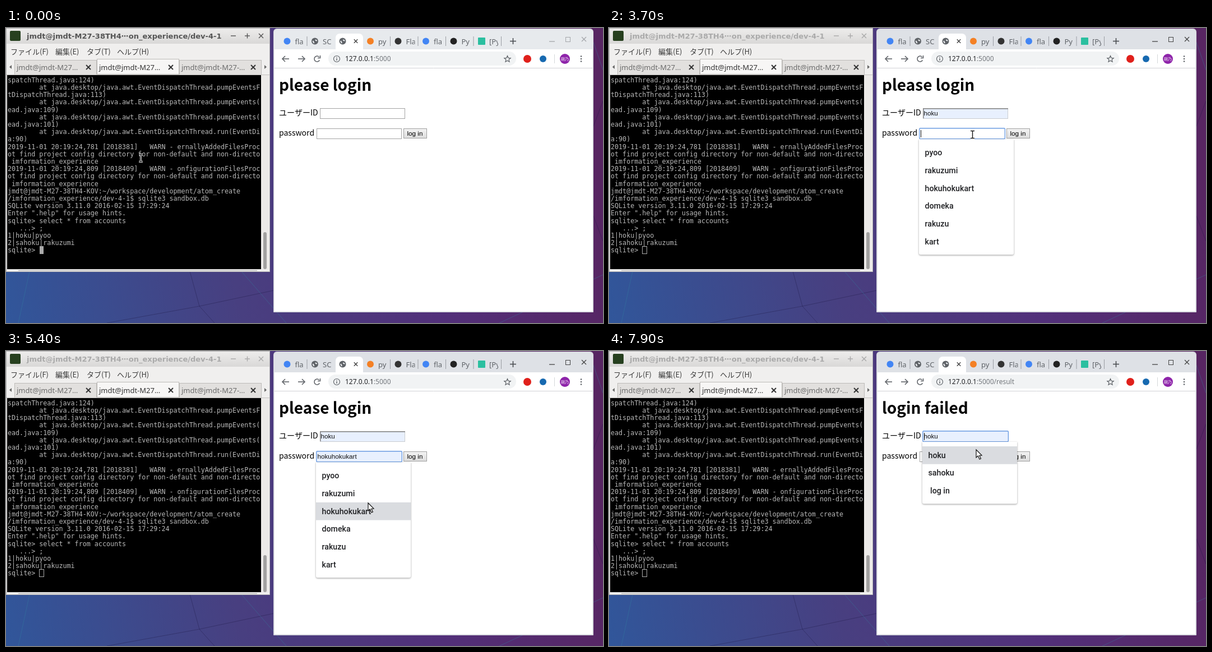
An HTML page with a canvas for the animation above (8 s loop, 1065 by 526 pixels).

```html
<!DOCTYPE html>
<html lang="ja">
<head>
<meta charset="utf-8">
<style>
html, body { margin: 0; width: 1065px; height: 526px; overflow: hidden; }
canvas { display: block; }
</style>
</head>
<body>
<canvas id="stage" width="1065" height="526"></canvas>
<script>
const ctx = document.getElementById('stage').getContext('2d');
const LOOP = 8000, STEP = 100;
const UI = '"Noto Sans", "Noto Sans CJK JP", sans-serif';
const CJK = '"Noto Sans CJK JP", "Noto Sans CJK", sans-serif';
const MONO = '"DejaVu Sans Mono", monospace';
const FORM = '"Liberation Sans", Arial, sans-serif';
const MENU = 'Roboto, sans-serif';

const USER = 'hoku', PASS = 'hokuhokukart', HOST = 'jmdt@jmdt-M27';
const PASSWORDS = ['pyoo', 'rakuzumi', PASS, 'domeka', 'rakuzu', 'kart'];
const USERS = [USER, 'sahoku', ' log in'];
const PUMP = '        at java.desktop/java.awt.EventDispatchThread.';
const CONFIG = ['ot find project config directory for non-default and non-directo', ' imformation_experience'];
const LOG = [
  'spatchThread.java:124)', PUMP + 'pumpEventsF',
  'tDispatchThread.java:113)', PUMP + 'pumpEvents(',
  'ead.java:109)', PUMP + 'pumpEvents(',
  'ead.java:101)', PUMP + 'run(EventDi', 'a:90)',
  '2019-11-01 20:19:24,781 [2018381]   WARN - ernallyAddedFilesProc', ...CONFIG,
  '2019-11-01 20:19:24,809 [2018409]   WARN - onfigurationFilesProc', ...CONFIG,
  HOST + '-38TH4-KOV:~/workspace/development/atom_create',
  '/imformation_experience/dev-4-1$ sqlite3 sandbox.db',
  'SQLite version 3.11.0 2016-02-15 17:29:24',
  'Enter ".help" for usage hints.',
  'sqlite> select * from accounts', '   ...> ;',
  `1|${USER}|pyoo`, '2|sahoku|rakuzumi', 'sqlite> '
];

// Pointer path: time, x, y
const PATH = [
  [200, 240, 232], [500, 130, 330], [800, 60, 398], [1000, 22, 384], [1100, 24, 390],
  [1300, 60, 372], [1600, 300, 262], [1800, 520, 170], [2000, 686, 102],
  [2100, 697, 112], [2200, 672, 148], [2300, 658, 156], [2500, 658, 156],
  [2600, 655, 184], [3600, 655, 184], [3700, 648, 190], [4200, 648, 258],
  [4400, 648, 258], [4500, 646, 270], [4600, 646, 270.5], [5000, 646, 270.5],
  [5100, 646, 266], [5200, 646, 263], [5300, 646, 263], [5400, 646, 270.5],
  [6200, 646, 270.5], [6300, 714, 203], [6500, 722, 190], [6800, 724, 190],
  [7000, 712, 195], [7100, 692, 196], [7200, 672, 180], [7300, 672, 180],
  [7400, 663, 161], [7500, 663, 161], [7600, 660, 157], [7700, 660, 157],
  [7800, 657, 171], [7900, 655, 176]
];

function pointerAt(t) {
  let a = PATH[0];
  for (const b of PATH) {
    if (t < b[0]) {
      const k = Math.max(0, (t - a[0]) / (b[0] - a[0] || 1));
      return { x: a[1] + (b[1] - a[1]) * k, y: a[2] + (b[2] - a[2]) * k };
    }
    a = b;
  }
  return { x: a[1], y: a[2] };
}

function rect(x, y, w, h, color) { ctx.fillStyle = color; ctx.fillRect(x, y, w, h); }
function frame(x, y, w, h, color) {
  ctx.strokeStyle = color; ctx.lineWidth = 1;
  ctx.strokeRect(x + .5, y + .5, w - 1, h - 1);
}
function round(x, y, w, h, r, color) {
  ctx.fillStyle = color; ctx.beginPath(); ctx.roundRect(x, y, w, h, r); ctx.fill();
}
function disc(x, y, r, color) {
  ctx.fillStyle = color; ctx.beginPath(); ctx.arc(x, y, r, 0, 7); ctx.fill();
}
function line(color, width, ...p) {
  ctx.strokeStyle = color; ctx.lineWidth = width; ctx.beginPath();
  for (let i = 0; i < p.length; i += 2) ctx.lineTo(p[i], p[i + 1]);
  ctx.stroke();
}
function text(s, x, y, font, color) { ctx.font = font; ctx.fillStyle = color; ctx.fillText(s, x, y); }
function cross(x, y, r, color, w) {
  line(color, w, x - r, y - r, x + r, y + r);
  line(color, w, x - r, y + r, x + r, y - r);
}
function vertical(y0, y1, c0, c1) {
  const g = ctx.createLinearGradient(0, y0, 0, y1);
  g.addColorStop(0, c0); g.addColorStop(1, c1);
  return g;
}

function wallpaper() {
  const g = ctx.createLinearGradient(0, 500, 1065, 300);
  g.addColorStop(0, '#31569a'); g.addColorStop(.38, '#483f80');
  g.addColorStop(.7, '#52307a'); g.addColorStop(1, '#572562');
  rect(0, 0, 1065, 526, g);
  const teal = 'rgba(50,130,160,.4)', dark = 'rgba(30,25,70,.4)';
  line(teal, 1, 42, 434, 22, 526);
  line(dark, 1, 345, 496, 328, 434);
  line(dark, 1, 180, 526, 345, 496, 477, 468);
  line(dark, 1, 345, 496, 372, 526);
  line(teal, 1, 420, 434, 500, 526);
  line(teal, 1, 880, 526, 1065, 440);
  line(teal, 1, 1046, 20, 1065, 75);
  line(dark, 1, 1046, 180, 1065, 130);
  line(dark, 1, 1046, 330, 1065, 380);
}

function terminal(active) {
  rect(0, 0, 471, 435, '#f0efee');
  rect(0, 0, 471, 28, vertical(0, 28, '#eeedec', '#d9d8d7'));
  const ink = active ? '#555' : '#aaa';
  round(7, 5, 19, 18, 2, '#27401f');
  text(HOST + '-38TH4⋯on_experience/dev-4-1', 37, 19, 'bold 13px "DejaVu Sans", sans-serif', ink);
  line(ink, 1.4, 401, 14, 410, 14);
  line(ink, 1.4, 426, 14, 435, 14);
  line(ink, 1.4, 430.5, 9.5, 430.5, 18.5);
  cross(455, 14, 4, ink, 1.4);

  [['ファイル(F)', 8], ['編集(E)', 88], ['タブ(T)', 144], ['ヘルプ(H)', 198]]
    .forEach(([s, x]) => text(s, x, 47, '13px ' + CJK, '#3c3c3c'));

  for (let i = 0; i < 3; i++) {
    const x = 15 + i * 147, on = i === 1;
    rect(x, on ? 55 : 57, 146, on ? 29 : 26, on ? '#f7f6f5' : '#e2e0de');
    frame(x, on ? 55 : 57, 147, 28, '#bdbbb8');
    text(HOST + (i === 2 ? '-…' : '…'), x + 4, 75, '13px ' + UI, on ? '#333' : '#6b6b6b');
    cross(147 + i * 147, 70, 4, '#333', 2);
  }
  ctx.fillStyle = '#666';
  for (const [x, d] of [[8, -1], [463, 1]]) {
    ctx.beginPath(); ctx.moveTo(x - 2 * d, 66); ctx.lineTo(x + 2 * d, 69.5); ctx.lineTo(x - 2 * d, 73); ctx.fill();
  }
  line('#c4c2c0', 1, 0, 83.5, 470, 83.5);

  rect(2, 84, 453, 346, '#000');
  ctx.save();
  ctx.beginPath(); ctx.rect(2, 84, 453, 346); ctx.clip();
  LOG.forEach((s, i) => text(s, 3, 96.8 + i * 13.2, '11.7px ' + MONO, '#b8b8b8'));
  ctx.restore();
  if (active) rect(60, 389, 7, 14, '#aaa'); else frame(59, 389, 9, 14, '#aaa');

  rect(455, 84, 14, 346, '#eceae8');
  round(459, 364, 6, 66, 3, '#a2a1a0');
  line('#aaa', 1, 22, 432.5, 448, 432.5);
  frame(0, 0, 471, 435, '#b4b3b4');
}

function globe(x, y) {
  disc(x, y, 6, '#5f6368');
  ctx.fillStyle = '#eceef1';
  ctx.beginPath(); ctx.ellipse(x - 2.5, y + 1.5, 1.2, 2.6, -.5, 0, 7); ctx.fill();
  ctx.beginPath(); ctx.ellipse(x + 2.2, y - 1.5, 2, 1.2, .5, 0, 7); ctx.fill();
}

function browserChrome(active, url) {
  const strip = active ? '#dee1e6' : '#e7eaed', ink = '#5f6368';
  round(477, 1, 571, 506, [6, 6, 1, 1], '#d3d4da');
  round(478, 2, 569, 504, [5, 5, 0, 0], strip);
  round(588, 10, 49, 32, [7, 7, 0, 0], '#fff');
  rect(479, 38, 567, 467, '#fff');

  const tabs = [['fla', '#4285f4'], ['SC', 0], ['', 0], ['py', '#f48024'], ['Fla', '#333'],
    ['fla', '#4285f4'], ['Py', '#222'], ['[Py', '#2bbfa0']];
  tabs.forEach(([s, color], i) => {
    const x = 501.5 + i * 49.5;
    if (!color) globe(x, 23.5);
    else if (i === 7) round(x - 6, 17, 13, 13, 1, color);
    else disc(x, 23.5, 6, color);
    ctx.save();
    ctx.beginPath(); ctx.rect(x + 10, 10, 20, 28); ctx.clip();
    text(s, x + 14, 28.5, '13px ' + UI, ink);
    ctx.restore();
    if (i !== 1 && i !== 2) line('#9a9da3', 1, x + 35.5, 15, x + 35.5, 32);
  });
  cross(624, 23.5, 3.2, '#444', 1.4);
  line('#4a4d52', 1.6, 899, 23.5, 910, 23.5);
  line('#4a4d52', 1.6, 904.5, 18, 904.5, 29);
  const control = active ? '#444' : '#a5a7ab';
  line(control, 1.3, 969, 24, 979, 24);
  frame(998, 16, 9, 9, control);
  cross(1031, 20, 4, control, 1.3);

  for (const [x, d] of [[499, -1], [527, 1]]) {
    line(ink, 1.6, x - 6 * d, 55, x + 5 * d, 55);
    line(ink, 1.6, x + d, 50, x + 6 * d, 55, x + d, 60);
  }
  ctx.strokeStyle = ink; ctx.lineWidth = 1.6;
  ctx.beginPath(); ctx.arc(555, 55, 5, .5, 5.5); ctx.stroke();
  line(ink, 1.6, 560.5, 49, 560.5, 53.5, 556, 53.5);

  round(575, 42, 335, 25, 12.5, '#f1f3f4');
  ctx.strokeStyle = ink; ctx.lineWidth = 1.2;
  ctx.beginPath(); ctx.arc(590, 55, 5.5, 0, 7); ctx.stroke();
  rect(589.3, 54, 1.4, 4, ink);
  rect(589.3, 51.5, 1.4, 1.4, ink);
  text('127.0.0.1', 605, 59, '12px ' + UI, '#202124');
  const hostWidth = ctx.measureText('127.0.0.1').width;
  text(url, 605 + hostWidth, 59, '12px ' + UI, '#73777c');

  ctx.strokeStyle = ink; ctx.lineWidth = 1.2; ctx.beginPath();
  for (let i = 0; i < 10; i++) {
    const a = -Math.PI / 2 + i * Math.PI / 5, r = i % 2 ? 2.7 : 6;
    ctx.lineTo(894.5 + r * Math.cos(a), 55.5 + r * Math.sin(a));
  }
  ctx.closePath(); ctx.stroke();
  disc(930, 55, 7, '#e0201b');
  disc(958, 55, 6, '#1769b0');
  line('#d5d7da', 1, 978.5, 47, 978.5, 63);
  disc(997, 55, 9, '#8e24aa');
  text('朔乃', 990, 58, '7px ' + CJK, '#fff');
  for (let i = -1; i < 2; i++) disc(1026, 55 + i * 4.5, 1.3, ink);
  line('#d0d2d5', 1, 479, 71.5, 1046, 71.5);
}

function field(x, y, f) {
  rect(x, y, 152, 19, f.filled ? '#e8f0fe' : '#fff');
  if (f.focus) {
    ctx.strokeStyle = '#6b9ce2'; ctx.lineWidth = 1.4;
    ctx.beginPath(); ctx.roundRect(x - .2, y - .2, 152.6, 18.8, 1.5); ctx.stroke();
  } else if (f.filled) {
    frame(x, y, 152, 19, '#c9ccd0');
    rect(x, y, 152, 1.6, '#858585');
    rect(x, y, 1.6, 18, '#858585');
  } else frame(x, y, 152, 19, '#a3a3a3');
  text(f.value || '', x + 1.5, y + 13.3, '11.7px ' + FORM, '#111');
  const w = ctx.measureText(f.value || '').width;
  if (f.spell) {
    ctx.strokeStyle = '#e24b4b'; ctx.lineWidth = 1; ctx.beginPath();
    for (let i = 0; i <= w; i += 1.5) ctx.lineTo(x + 1.5 + i, y + 15 + (i / 1.5 % 2));
    ctx.stroke();
  }
  if (f.caret) rect(x + 2 + (f.caret === 'end' ? w : 0), y + 3, 1, 13, '#111');
}

const ROW = 31.7;
function popup(p) {
  const h = p.items.length * ROW + 15.5;
  ctx.save();
  ctx.shadowColor = 'rgba(0,0,0,.4)'; ctx.shadowBlur = 3; ctx.shadowOffsetY = 1;
  round(p.x, p.y, 169, h, [0, 0, 3, 3], '#fff');
  ctx.restore();
  p.items.forEach((s, i) => {
    const y = p.y + 8 + i * ROW;
    if (i === p.row) rect(p.x, y, 169, ROW, '#dadce0');
    text(s, p.x + 10.5, y + 20.7, '500 14.2px ' + MENU, '#202124');
  });
}

function page(s) {
  text(s.title, 487, 112, 'bold 28px ' + CJK, '#000');
  text('ユーザーID', 487, 155.5, '14px ' + CJK, '#000');
  text('password', 487, 192, '14px ' + CJK, '#000');
  field(560, 143, s.user);
  field(554, 179, s.pass);
  rect(709, 179, 42, 18, vertical(179, 197, '#f4f4f4', '#dcdcdc'));
  frame(709, 179, 42, 18, '#a0a0a0');
  text('log in', 715.5, 192, '11.7px ' + FORM, '#000');
  if (s.popup) popup(s.popup);
}

function inside(p, x, y, w, h) { return p.x >= x && p.x < x + w && p.y >= y && p.y < y + h; }

function pointer(p, menu) {
  const overMenu = menu && inside(p, menu.x, menu.y, 169, menu.items.length * ROW + 15);
  const overText = inside(p, 2, 84, 453, 346) || inside(p, 560, 143, 152, 19) || inside(p, 554, 179, 152, 19);
  ctx.save();
  ctx.translate(Math.round(p.x), Math.round(p.y));
  if (overText && !overMenu) {
    for (const [color, w] of [['#fff', 3.2], ['#111', 1.4]]) {
      line(color, w, .5, -6, .5, 6);
      line(color, w, -3, -6.5, 4, -6.5);
      line(color, w, -3, 6.5, 4, 6.5);
    }
  } else {
    ctx.beginPath();
    [[0, 0], [0, 14], [3.3, 11], [6, 17], [8.4, 16], [5.8, 10.3], [10, 10]].forEach(q => ctx.lineTo(...q));
    ctx.closePath();
    ctx.fillStyle = '#fff'; ctx.fill();
    ctx.strokeStyle = '#111'; ctx.lineWidth = 1.2; ctx.stroke();
  }
  ctx.restore();
}

function sceneAt(t) {
  const p = pointerAt(t);
  const s = { p, active: t >= 2600, title: 'please login', url: ':5000', user: {}, pass: {} };
  const open = (x, y, items) => {
    const row = Math.floor((p.y - y - 8) / ROW);
    s.popup = { x, y, items, row };
    return items[row];
  };
  if (t >= 6800) {
    s.title = 'login failed';
    s.url = ':5000/result';
    if (t >= 7600) {
      const value = open(559, 162, USERS);
      s.user = { focus: true, value, filled: !!value, caret: 'start' };
    }
  } else if (t >= 2600) {
    s.user = { value: USER, filled: true };
    if (t < 3700) Object.assign(s.user, { focus: true, spell: true, caret: 'end' });
    else if (t < 5900) {
      const value = open(553, 198.5, PASSWORDS);
      s.pass = { focus: true, value, filled: !!value, caret: (t < 4200 || t >= 5700) && 'start' };
    } else s.pass = { focus: true, value: PASS, filled: true, spell: true, caret: 'end' };
  }
  return s;
}

function draw(now) {
  const t = Math.floor(now % LOOP / STEP) * STEP;
  const s = sceneAt(t);
  wallpaper();
  terminal(!s.active);
  browserChrome(s.active, s.url);
  page(s);
  pointer(s.p, s.popup);
}

const start = performance.now();
function tick() {
  draw(performance.now() - start);
  requestAnimationFrame(tick);
}
tick();
</script>
</body>
</html>
```
